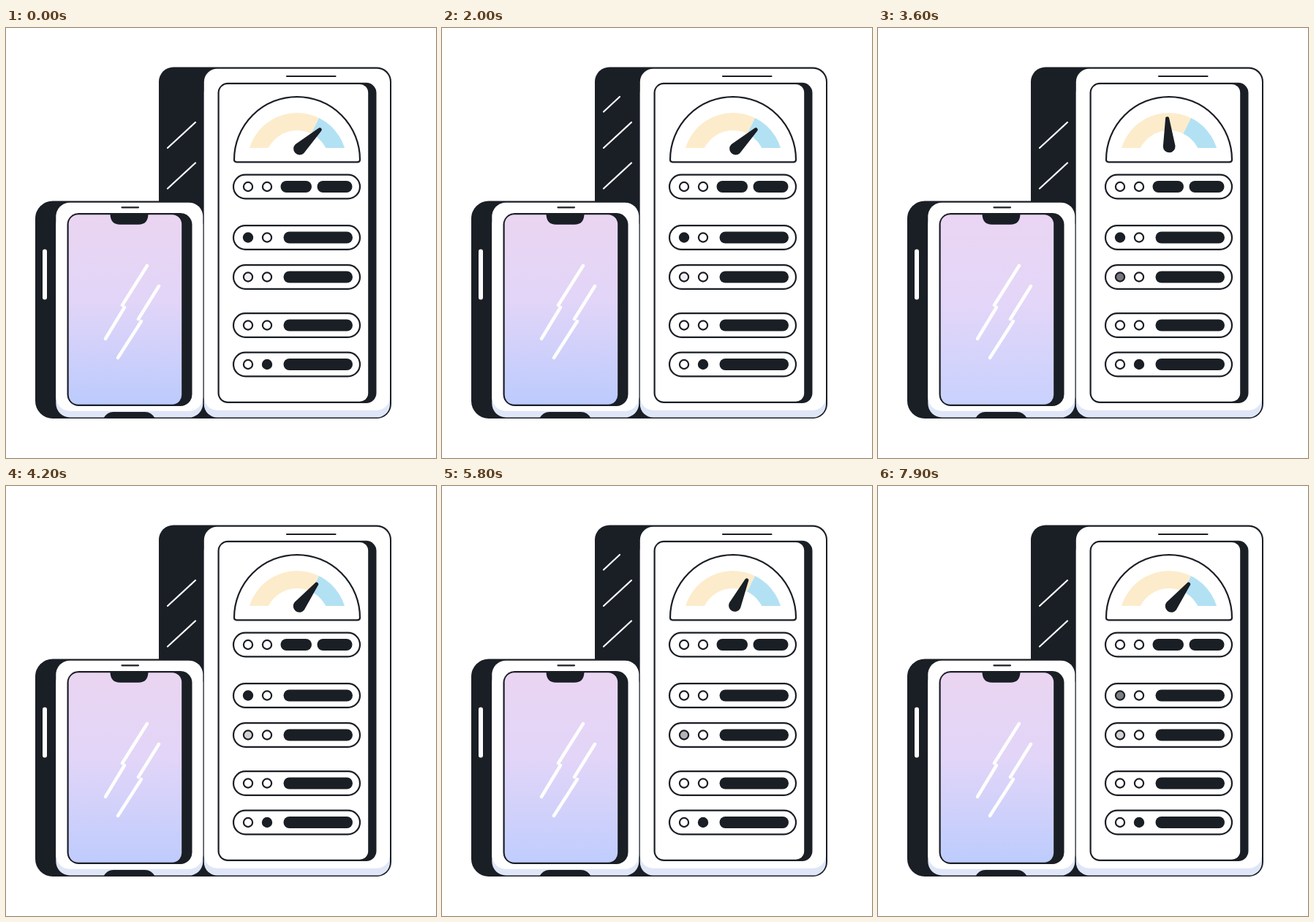
These frames come from a looping animation (588 by 588 pixels, 8000 ms). An HTML page:

```html
<!DOCTYPE html>
<html lang="en">
<head>
<meta charset="utf-8">
<title>Devices</title>
<style>
html, body { margin: 0; width: 100%; height: 100%; overflow: hidden; background: #fff; }
svg { display: block; width: 100vw; height: 100vh; }
.dark { fill: #1a1e25; }
.white { fill: #fff; }
.lip { fill: #dfe6f8; }
.face { fill: #fff; stroke: #1a1e25; stroke-width: 2.2; }
.line { fill: none; stroke: #1a1e25; stroke-width: 2.2; stroke-linecap: round; }
.shine { fill: none; stroke: #fff; stroke-width: 2.2; stroke-linecap: round; }
</style>
</head>
<body>
<svg viewBox="0 0 588 588">
  <defs>
    <linearGradient id="glow" x1="0" y1="0" x2="0" y2="1">
      <stop id="top" offset="0"/>
      <stop id="mid" offset=".45"/>
      <stop id="low" offset="1"/>
    </linearGradient>
    <clipPath id="dial"><rect x="320" y="100" width="156" height="64"/></clipPath>
  </defs>

  <!-- tower -->
  <rect class="dark" x="209" y="53.5" width="318" height="480.5" rx="20"/>
  <path class="shine" d="M221 164L259 129M221 219.5L259 184.5"/>
  <path class="shine" id="dash"/>
  <rect class="lip" x="270.8" y="70" width="254.2" height="462.5" rx="18"/>
  <rect class="white" x="270.8" y="55.7" width="254.2" height="467" rx="18"/>
  <path class="line" d="M384 66H450.5"/>
  <rect class="dark" x="289.5" y="74.8" width="217" height="438.2" rx="14"/>
  <rect class="white" x="291.7" y="77" width="203.5" height="433.8" rx="11.5"/>

  <!-- gauge -->
  <path class="face" d="M312 180A86 86 0 0 1 484 180Q484 183.3 480.5 183.3H315.5Q312 183.3 312 180Z"/>
  <g clip-path="url(#dial)" fill="none" stroke-width="24">
    <path stroke="#fdeccb" d="M342 184A56 56 0 0 1 422.7 133.8"/>
    <path stroke="#b3e1f4" d="M422.7 133.8A56 56 0 0 1 454 184"/>
  </g>
  <path class="dark" id="needle" d="M-6.4 -5L-.6 -43a2.6 2.6 0 0 1 5.2 0L10.4 -5A8.4 8.4 0 0 1 -6.4 -5Z"/>
  <g id="rows"></g>

  <!-- phone -->
  <path class="dark" d="M64 236.5H250Q270.3 236.5 270.3 257V534H64A24 24 0 0 1 40 510V260.5A24 24 0 0 1 64 236.5Z"/>
  <path d="M53 305.5V368.5" stroke="#fff" stroke-width="6" stroke-linecap="round"/>
  <rect class="lip" x="68.3" y="250" width="201" height="282.5" rx="19"/>
  <rect class="white" x="68.3" y="238.7" width="201" height="285" rx="19"/>
  <path class="dark" d="M133 534Q138 525 147 525H190Q199 525 204 534Z"/>
  <path class="line" d="M158.5 245.3H181"/>
  <rect class="dark" x="83.5" y="253" width="171" height="264" rx="16"/>
  <rect x="85.7" y="255.2" width="154.5" height="259.6" rx="13" fill="url(#glow)"/>
  <path class="dark" d="M142.5 254H194.5Q194.5 268.7 181 268.7H156Q142.5 268.7 142.5 254Z"/>
  <path d="M193 325L159 379M162 382L136 425M209 353L181 398M185 401L153 451" stroke="#fff" stroke-width="4.5" stroke-linecap="round"/>
</svg>
<script>
const byId = id => document.getElementById(id);
const INK = [26, 30, 37], WHITE = [255, 255, 255];

const bar = (x, y, w) => `<rect class="dark" x="${x}" y="${y - 8}" width="${w}" height="16" rx="8"/>`;
const lamp = (x, y, id) => `<circle id="${id}" class="face" cx="${x}" cy="${y}" r="6.1"/>`;

byId('rows').innerHTML = [217, 286.5, 340.5, 406.5, 460].map((y, i) =>
  `<rect class="face" x="311" y="${y - 16.3}" width="173" height="32.6" rx="16.3"/>` +
  lamp(331, y, 'a' + i) + lamp(357, y, 'b' + i) +
  (i ? bar(379.5, y, 94.5) : bar(375.5, y, 42.5) + bar(425.5, y, 48))
).join('');
byId('b4').style.fill = '#1a1e25';

const mix = (a, b, k) => `rgb(${a.map((v, i) => Math.round(v + (b[i] - v) * k))})`;
const ramp = (v, from, to) => Math.min(1, Math.max(0, (v - from) / (to - from)));
const wave = (t, peak) => Math.cos(Math.PI * (t - peak) / 1000);

// Time to the nearest repeat of a moment.
function gap(t, period, moment) {
  const d = (t - moment + period) % period;
  return Math.min(d, period - d);
}

function render(time) {
  const t = Math.floor(time % 8000 / 100) * 100;

  // A cosine bent towards a triangle wave.
  const angle = 53 * Math.asin(.9 * wave(t, 50)) - 11.3;
  byId('needle').setAttribute('transform', `translate(396.5 167) rotate(${angle})`);

  byId('a1').style.fill = mix(WHITE, INK, ramp(gap(t, 1000, 800), 0, 175));
  byId('a2').style.fill = mix(WHITE, INK, ramp(gap(t, 2000, 50), 0, 750));

  const len = ramp(gap(t, 4000, 1500), 740, 500);
  byId('dash').setAttribute('d', len > 0 ? `M221 114.5l${22 * len} ${-20.5 * len}` : '');

  const cool = .5 + .5 * wave(t, 20);
  byId('top').style.stopColor = mix([235, 214, 246], [234, 213, 241], cool);
  byId('mid').style.stopColor = mix([230, 215, 248], [226, 213, 248], cool);
  byId('low').style.stopColor = mix([221, 219, 253], [188, 203, 253], cool);
}

const start = performance.now();
function tick() {
  render(performance.now() - start);
  requestAnimationFrame(tick);
}
tick();
</script>
</body>
</html>
```
